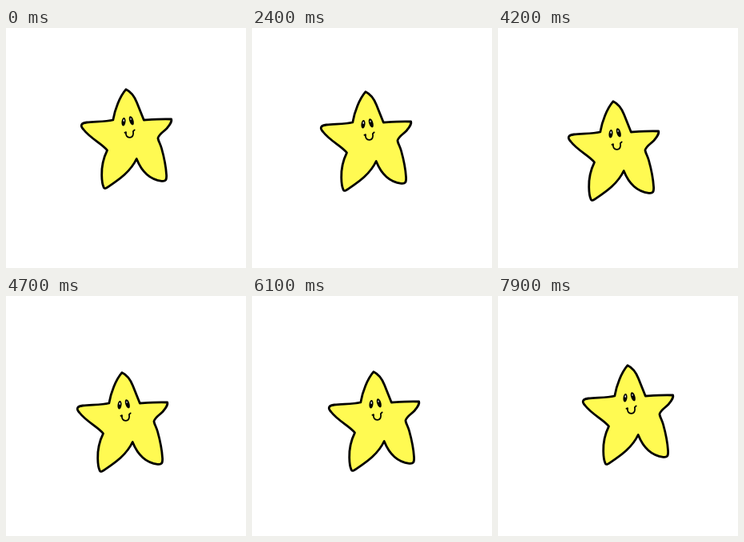
An HTML page that plays this animation: 300x300 px, repeating every 8000 ms.

```html
<!DOCTYPE html>
<html lang="en">
<head>
<meta charset="utf-8">
<title>Drifting star</title>
<style>
  html, body { margin: 0; height: 100%; overflow: hidden; background: #fff; }
  svg { display: block; width: 100%; height: 100%; }
</style>
</head>
<body>
<svg viewBox="0 0 300 300">
  <g id="star" stroke="#000" stroke-linecap="round" stroke-linejoin="round">
    <path fill="#fffa52" stroke-width="2.8" d="M150 76.7
      C155 79 160.5 85.5 163.5 93 L172.3 115
      C183 114.3 196 113.3 206.7 114
      C207.5 116 205 121 201 125.5
      C197 129.5 191 133 190 137.5
      C189.8 140 193 145 194.5 150.5
      C198 163 200 174 200.6 184
      C200.9 190 199.5 192 194.5 191.3
      C179 189.5 169 178 163.2 163.5
      C156 179 142 189 128 198.3
      C126 199.8 123.5 201.5 122.3 199.5
      C120.5 196 119.8 191 119.7 184
      C119.4 174 122 162 126.5 152.8
      C120 144.5 106 138.5 97 127
      C92 121.5 94 119 101 118
      C110 116.8 124 117.2 133.8 115
      C136 102 142 86 150 76.7Z"/>
    <g stroke="none">
      <ellipse cx="147" cy="117.2" rx="2.5" ry="5.3" transform="rotate(7 147 117.2)"/>
      <ellipse cx="156.8" cy="115.8" rx="2.6" ry="5.8" transform="rotate(-18 156.8 115.8)"/>
      <g fill="#fff">
        <ellipse cx="147.2" cy="115.4" rx=".7" ry="1.5"/>
        <ellipse cx="156" cy="113.8" rx=".6" ry="1.3"/>
      </g>
    </g>
    <path fill="none" stroke-width="1.8" d="M148.4 130.8L150 130.2C149.4 134 151.2 136.9 154.6 136.8C158.8 136.6 159.6 133 158.9 129.2L160.7 127.4"/>
  </g>
</svg>
<script>
const STEP_MS = 100, STEPS = 80;

// Turning points of the drift: step, x, y.
const path = [
  [0, -0.45, 0.12],
  [26, -8.4, 3.45],
  [52, -4.2, 22.2],
  [75, 11, 12],
  [80, 12.4, 9.6]
];

const star = document.getElementById('star');
const start = performance.now();

// Straight drift between turning points, snapped to whole pixels.
function positionAt(step) {
  const next = path.findIndex(([s]) => s > step);
  const [from, to] = [path[next - 1], path[next]];
  const t = (step - from[0]) / (to[0] - from[0]);
  return [1, 2].map(axis => Math.round(from[axis] + (to[axis] - from[axis]) * t));
}

function draw(now) {
  const step = Math.floor(Math.max(0, now - start) / STEP_MS) % STEPS;
  star.setAttribute('transform', `translate(${positionAt(step)})`);
  requestAnimationFrame(draw);
}
draw(start);
</script>
</body>
</html>
```
